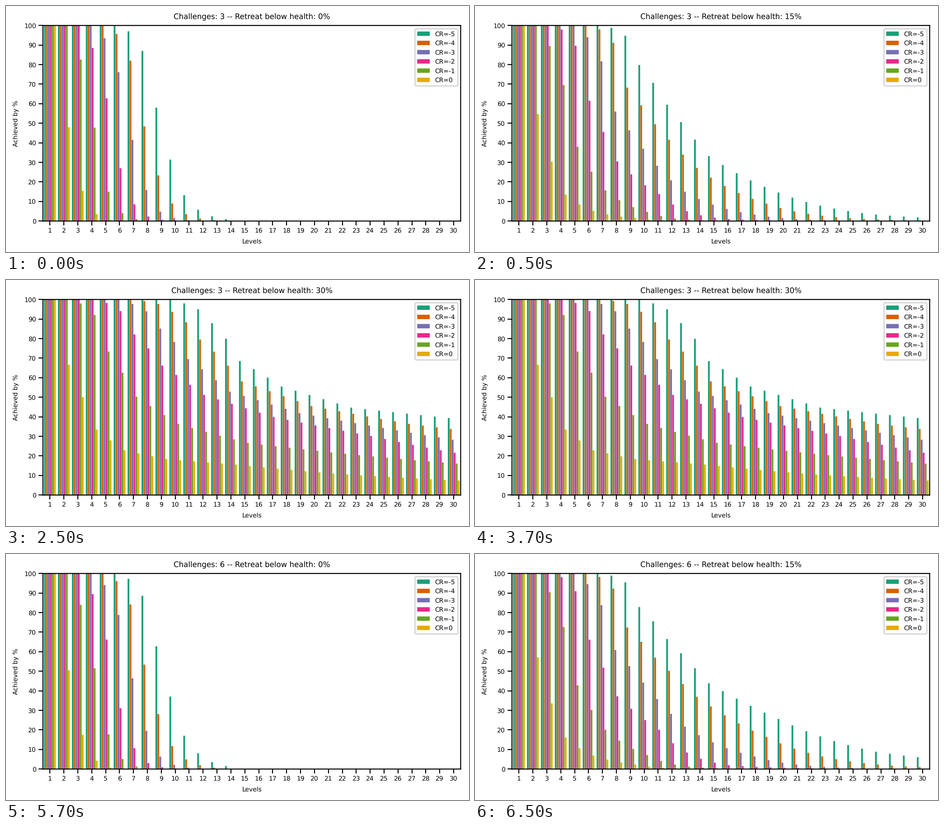
A matplotlib script for the animation above (8000 ms loop, 1025 by 546 pixels).

```python
import numpy as np
import matplotlib.pyplot as plt
from matplotlib.animation import FuncAnimation

W, H, DPI = 1025, 546, 200
LEFT, RIGHT, TOP, BOTTOM = 81.8, 1006.5, 43.2, 477.3
LEVELS = np.arange(1, 31)
COLORS = ["#1b9e77", "#d95f02", "#7570b3", "#e7298a", "#66a61e", "#e6ab02"]
STEP, BAR = 1 / 7, 0.127
SCENES = [(3, 0), (3, 15), (3, 30), (6, 0), (6, 15)]

# Key points lie at these widening distances from where a curve leaves 100 %.
GAPS = np.array([0, 2, 4, 7, 12, 19, 28])

# Per retreat limit and rating: first level below 100 %, then the key points.
KEYS = {
    0: [(7, 97, 58, 13.2, 1),
        (6, 95.7, 48.4, 9, 0.5),
        (5, 93.5, 41.5, 4.8, 0.15),
        (4, 88.5, 27, 2.3, 0.05),
        (3, 82.6, 15, 1),
        (2, 48, 3.5, 0.1)],
    15: [(8, 98.8, 79.8, 59.5, 33.2, 14.6, 3.3, 1.9),
         (7, 98, 68.2, 49.5, 27.2, 8.9, 1.1, 0.3),
         (6, 94, 56, 37, 15, 3.3, 0.2),
         (4, 97.9, 61.5, 30.5, 13.8, 1, 0.1),
         (3, 89.5, 38, 15.7, 4.7, 0.2),
         (2, 54.7, 13.6, 5.2, 1.5, 0.05)],
    30: [(11, 98, 87.9, 68.5, 55.5, 44.7, 39.4),
         (8, 99.2, 93.7, 79.5, 58.1, 45.5, 36.4, 33.8),
         (7, 97.7, 85.1, 69.5, 52.9, 41.9, 33.1, 28.3),
         (5, 98.2, 82.1, 66.2, 51.2, 39.9, 30.2, 21.6),
         (3, 98, 73.4, 50.3, 36.4, 26.7, 21.1, 16.1),
         (2, 66.6, 33.5, 22.9, 18.4, 15.6, 11, 7.4)],
}

plt.rcParams.update({"font.family": "DejaVu Sans", "font.size": 5,
                     "text.hinting": "none"})


def curve(challenges, start, *keys):
    """Join the key points by straight lines in log odds."""
    share = np.array(keys) / 100
    x = np.minimum(start + GAPS[:len(keys)], LEVELS[-1])
    odds = np.interp(LEVELS, x, np.log(share / (1 - share)), right=-20)
    if challenges == 6:  # more challenges lift the odds, most at high levels
        odds += 0.1 + 0.05 * (LEVELS - start)
    return np.where(LEVELS < start, 100, 100 / (1 + np.exp(-odds)))


fig = plt.figure(figsize=(W / DPI, H / DPI), dpi=DPI, facecolor="white")
ax = fig.add_axes([LEFT / W, 1 - BOTTOM / H,
                   (RIGHT - LEFT) / W, (BOTTOM - TOP) / H])
ax.set(xlim=(0.5, 30.5), ylim=(0, 100), xticks=LEVELS,
       yticks=range(0, 101, 10))
ax.set_xlabel("Levels", labelpad=3.7)
ax.set_ylabel("Achieved by %", labelpad=4)
ax.tick_params(length=3.5, width=0.8, pad=2)
title = ax.set_title("", fontsize=6, pad=4.8)

groups = [
    ax.bar(LEVELS + (i - 2.5) * STEP, np.zeros(30), BAR, color=color,
           label=f"CR={i - 5}", snap=False)
    for i, color in enumerate(COLORS)
]
legend = ax.legend(loc="upper right")
for patch in [*ax.spines.values(), *legend.get_patches()]:
    patch.set_snap(False)


def update(frame):
    # the first scene lasts one tick, the others four
    challenges, retreat = SCENES[(frame + 3) // 4]
    title.set_text(f"Challenges: {challenges} -- "
                   f"Retreat below health: {retreat}%")
    for bars, keys in zip(groups, KEYS[retreat]):
        for bar, value in zip(bars, curve(challenges, *keys)):
            bar.set_height(value)
    return [title]


anim = FuncAnimation(fig, update, frames=16, interval=500, repeat=True,
                     repeat_delay=0, blit=False)
plt.show()
```
